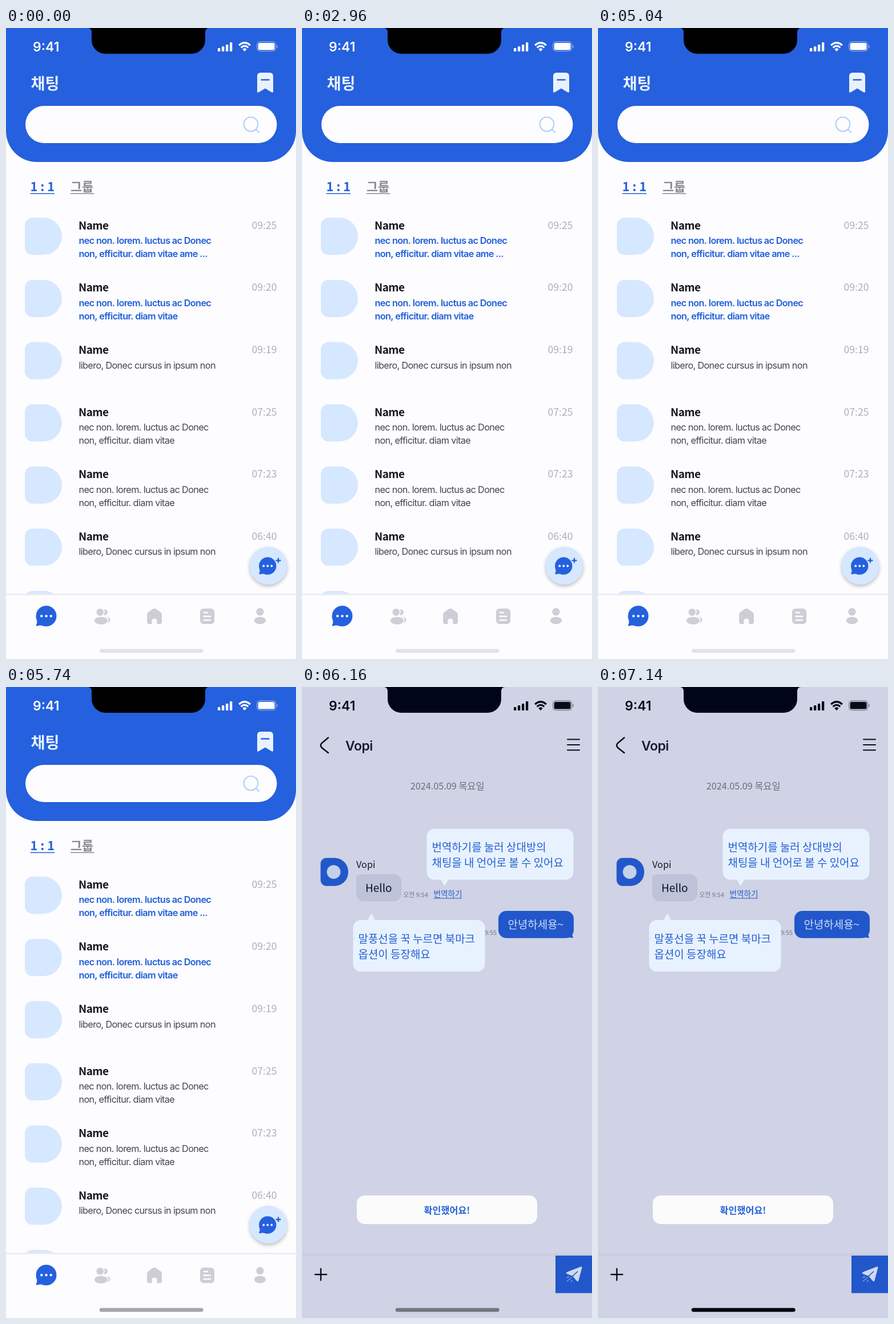
Animation, 508 px wide and 1102 px high, one loop 8000 ms. Source, as an HTML page with a canvas:

```html
<!DOCTYPE html>
<html lang="ko">
<head>
<meta charset="utf-8">
<title>Chat</title>
<style>
  html, body { margin: 0; width: 100%; height: 100%; overflow: hidden; background: #fdfcff; }
  canvas { display: block; width: 508px; height: 1102px; }
</style>
</head>
<body>
<canvas id="stage"></canvas>
<script>
const W = 508, H = 1102, LOOP = 8000, OPEN_CHAT = 5760;
const BAR_START = 5200, BAR_END = 7140;
const KR = '"Noto Sans CJK KR", "Noto Sans CJK", "Noto Sans KR", sans-serif';
const UI = 'Inter, "Noto Sans CJK KR", sans-serif';
const BLUE = '#2560de', PALE = '#d6e8ff', PAPER = '#fdfcff', ICE = '#e8f2ff', GREY = '#cfcdd6';
const INK = '#080b18', DIM = '#cfd3e5', NAVY = '#2157cb';

const canvas = document.getElementById('stage');
const ctx = canvas.getContext('2d');
const ratio = window.devicePixelRatio || 1;
canvas.width = W * ratio;
canvas.height = H * ratio;

function rect(x, y, w, h, r, color) {
  ctx.fillStyle = color;
  ctx.beginPath();
  ctx.roundRect(x, y, w, h, r);
  ctx.fill();
}

function disc(x, y, r, color, ry = r) {
  ctx.fillStyle = color;
  ctx.beginPath();
  ctx.ellipse(x, y, r, ry, 0, 0, Math.PI * 2);
  ctx.fill();
}

function shape(path, color) {
  ctx.fillStyle = color;
  ctx.fill(new Path2D(path));
}

function line(path, color, width, cap = 'round') {
  ctx.strokeStyle = color;
  ctx.lineWidth = width;
  ctx.lineCap = cap;
  ctx.lineJoin = 'round';
  ctx.stroke(new Path2D(path));
}

function text(str, x, y, size, color, { font = KR, weight = 400, align = 'left', gap = 0 } = {}) {
  ctx.font = `${weight} ${size}px ${font}`;
  ctx.letterSpacing = gap + 'px';
  ctx.textAlign = align;
  ctx.fillStyle = color;
  ctx.fillText(str, x, y);
}

function statusBar(color, notch) {
  shape('M143 0Q150 0 150 8V21A24 24 0 0 0 174 45H325A24 24 0 0 0 349 21V8Q349 0 356 0Z', notch);
  text('9:41', 47, 41, 23, color, { font: UI, weight: 600 });
  [6, 9, 12, 16].forEach((h, i) => rect(371 + i * 7, 41 - h, 4.3, h, 1.2, color));
  // wifi
  line('M408.2 30.2Q418 21.5 427.8 30.2', color, 3.4, 'butt');
  line('M411.7 34.3Q418 28.6 424.3 34.3', color, 3.2, 'butt');
  shape('M414.3 37Q418 33.7 421.7 37L418 41Z', color);
  // battery
  ctx.globalAlpha = 0.4;
  ctx.strokeStyle = color;
  ctx.lineWidth = 1.3;
  ctx.beginPath();
  ctx.roundRect(439.6, 24, 33, 16.6, 5);
  ctx.stroke();
  shape('M474 29.6Q476 30.4 476 32.4Q476 34.4 474 35.2Z', color);
  ctx.globalAlpha = 1;
  rect(441.6, 26, 29, 12.6, 3.2, color);
}

function chatIcon(x, y, r, dot) {
  disc(x, y, r, BLUE);
  const at = (dx, dy) => `${x + dx * r} ${y + dy * r}`;
  shape(`M${at(-0.98, 0.2)}Q${at(-0.82, 0.55)} ${at(-0.98, 0.86)}Q${at(-1, 1)} ${at(-0.84, 0.96)}Q${at(-0.55, 0.85)} ${at(-0.2, 0.98)}L${at(0, 0)}Z`, BLUE);
  for (const k of [-1, 0, 1]) disc(x + k * r * 0.46, y, dot, ICE);
}

function header() {
  rect(0, 0, W, 234, [0, 0, 54, 54], BLUE);
  text('채팅', 43.5, 106.5, 27.1, ICE, { weight: 700 });
  shape('M440 84Q440 78 446 78H462Q468 78 468 84V111Q468 114 465 112L454 105.5L443 112Q440 114 440 111Z', ICE);
  line('M447.5 90.5H460.5', BLUE, 2.5);
  rect(34, 136, 440.5, 65, 32.5, PAPER);
  ctx.strokeStyle = '#a9cdf8';
  ctx.lineWidth = 1.9;
  ctx.beginPath();
  ctx.arc(429, 168, 12.4, 0, Math.PI * 2);
  ctx.stroke();
  line('M438 177L443 182', '#a9cdf8', 1.9);
}

function tabs() {
  text('1 : 1', 42.5, 285, 21.8, BLUE, { weight: 700 });
  rect(42.5, 288.6, 42.5, 1.5, 0, BLUE);
  text('그룹', 113, 285, 21.8, '#8b8a8c', { weight: 700 });
  rect(113, 288.6, 41.5, 1.5, 0, '#8b8a8c');
}

const LONG = ['nec non. lorem. luctus ac Donec', 'non, efficitur. diam vitae'];
const SHORT = ['libero, Donec cursus in ipsum non'];
const ROOMS = [
  { time: '09:25', lines: [LONG[0], LONG[1] + ' ame ...'], unread: true },
  { time: '09:20', lines: LONG, unread: true },
  { time: '09:19', lines: SHORT },
  { time: '07:25', lines: LONG },
  { time: '07:23', lines: LONG },
  { time: '06:40', lines: SHORT },
  { time: '', lines: [] }
];

function room({ time, lines, unread }, i) {
  const y = 331.3 + i * 108.6;
  rect(33, y, 65, 65, [13.5, 32.5, 32.5, 13.5], PALE);
  if (!lines.length) return;
  text('Name', 127, y + 20.5, 19, '#17161b', { weight: 700, gap: -0.6 });
  text(time, 474.5, y + 19.5, 17.6, '#b1afb3', { weight: 300, align: 'right' });
  const style = { font: UI, weight: unread ? 600 : 400, gap: -0.65 };
  lines.forEach((s, n) => text(s, 127.5, y + 46 + n * 23, 16.26, unread ? '#1f5fd8' : '#47454b', style));
}

function newChatButton() {
  ctx.save();
  ctx.shadowColor = 'rgba(0,0,0,0.25)';
  ctx.shadowBlur = 6 * ratio;
  ctx.shadowOffsetY = 3 * ratio;
  disc(459.5, 939, 33, PALE);
  ctx.restore();
  chatIcon(458.3, 939.5, 15.2, 2);
  line('M473.5 930H480.5M477 926.5V933.5', BLUE, 2.3);
}

function navBar() {
  rect(0, 988, W, 114, 0, PAPER);
  rect(0, 988, W, 2.4, 0, '#ebeaf0');
  chatIcon(70.5, 1027, 18, 2.3);
  // friends
  disc(173, 1020.5, 5, GREY);
  disc(175, 1034, 7.5, GREY, 5.5);
  disc(164.8, 1020.2, 8, PAPER);
  disc(166.5, 1034.5, 13.2, PAPER, 8.4);
  disc(164.8, 1020.2, 6.3, GREY);
  disc(166.5, 1035, 11.5, GREY, 6.6);
  // home
  shape('M247 1025Q247 1022 249.5 1020L257 1014.8Q260 1012.8 263 1014.8L270.5 1020Q273 1022 273 1025V1037Q273 1041 269 1041H264.5V1035Q264.5 1031.5 260 1031.5Q255.5 1031.5 255.5 1035V1041H251Q247 1041 247 1037Z', GREY);
  // board
  rect(340, 1014, 25, 27, 6, GREY);
  line('M346.5 1021H353M346.5 1027.5H358M346.5 1034H358', PAPER, 2.4);
  // profile
  disc(445, 1019.5, 6.6, GREY);
  disc(445, 1034.8, 10.3, GREY, 6.3);
}

function listScreen() {
  rect(0, 0, W, H, 0, PAPER);
  header();
  statusBar(PAPER, '#000');
  tabs();
  ROOMS.forEach(room);
  navBar();
  newChatButton();
}

function tip(x, y, w, h, tail, lines) {
  rect(x, y, w, h, 13.5, ICE);
  shape(tail, ICE);
  lines.forEach((s, i) => text(s, x + 9, y + 39.8 + i * 27, 18.97, '#2460d2'));
}

function chatScreen() {
  rect(0, 0, W, H, 0, DIM);
  statusBar(INK, '#01051a');
  line('M46 88.5L36.5 96.5Q29 102 36.5 107.5L46 115', INK, 2.5);
  text('Vopi', 76, 111, 23, '#191c30', { font: UI, weight: 600, gap: -0.5 });
  line('M465 91.5H486M465 101H486M465 110.3H486', INK, 2);
  text('2024.05.09 목요일', 254.5, 179, 16.26, '#6e6c7a', { align: 'center' });

  rect(32.5, 298.5, 48.5, 49, [10, 24, 24, 10], NAVY);
  disc(55.5, 323, 12, '#c5d0ea');
  text('Vopi', 95, 316, 16.26, '#171a2b');
  rect(95, 327, 79.5, 47.5, 14, '#bec3da');
  shape('M95.5 328Q97 329 104 328L95 342Z', '#bec3da');
  text('Hello', 111, 358, 18.97, '#0d1020');
  text('오전 9:54', 177.5, 366.5, 10.84, '#74768a');
  text('번역하기', 230.5, 366, 13.55, '#265ac8');
  rect(230.5, 368.4, 49.5, 1.1, 0, '#265ac8');

  rect(344, 391, 132, 47.5, 14, NAVY);
  shape('M475.5 424Q471 432 475.5 438.3L464 437Z', NAVY);
  text('안녕하세용~', 360.5, 422, 18.97, '#d3dcf2');
  text('오전 9:55', 341, 432.8, 10.84, '#74768a', { align: 'right' });

  tip(218.5, 247.5, 257, 89, 'M243 336H256.5L251 346Q249.7 348 248.4 346Z', ['번역하기를 눌러 상대방의', '채팅을 내 언어로 볼 수 있어요']);
  tip(89.5, 407, 231, 90, 'M115 407.5H128L122.7 397.5Q121.5 395.5 120.3 397.5Z', ['말풍선을 꾹 누르면 북마크', '옵션이 등장해요']);

  rect(96, 888, 316, 50, 14, '#fbfbfc');
  text('확인했어요!', 254, 920, 16.26, '#2561d8', { weight: 700, align: 'center' });

  rect(0, 989.5, W, 3.5, 0, '#c8cddf');
  line('M23 1026H43M33 1016V1036', INK, 2.4);
  rect(444, 993, 64, 65.5, 0, NAVY);
  shape('M488 1012.5Q491 1011.8 490.3 1014.8L484.5 1036.5Q483.3 1039.5 481 1037L474 1028.8L464 1024.8Q461.5 1023.3 464.2 1021.8Z', '#cfd8ef');
  line('M473.5 1029.3L482.5 1021', NAVY, 1.6);
  line('M467.5 1029.5L464.5 1031.5M472 1031.5L464.5 1037.5M473.5 1036L471 1038.5', '#7f9fe0', 1.6);
}

function homeBar(t) {
  const p = Math.min(1, Math.max(0, (t - BAR_START) / (BAR_END - BAR_START)));
  const mix = (a, b) => Math.round(a + (b - a) * p);
  rect(163.7, 1084.4, 182, 6.9, 3.45, `rgb(${mix(227, 4)},${mix(226, 6)},${mix(230, 16)})`);
}

function draw(now) {
  const t = now % LOOP;
  ctx.setTransform(ratio, 0, 0, ratio, 0, 0);
  if (t < OPEN_CHAT) listScreen();
  else chatScreen();
  homeBar(t);
  requestAnimationFrame(draw);
}

requestAnimationFrame(draw);
</script>
</body>
</html>
```
